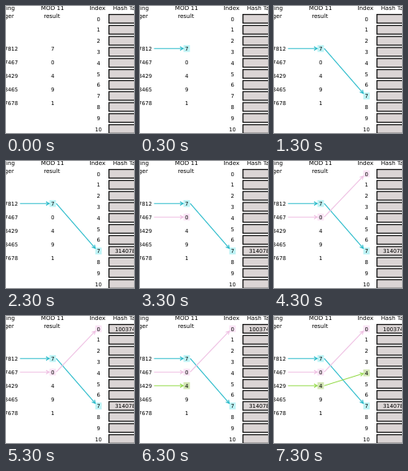
Write an HTML page that moves like this. It is 160x159 px and loops after 8 s.

```html
<!DOCTYPE html>
<html>
<head>
<meta charset="utf-8">
<title>Hash table insertion</title>
<style>
  html, body { margin: 0; width: 100%; height: 100%; overflow: hidden; background: #fff; }
  svg { display: block; width: 100%; height: 100%; }
  text { font: 7.2px "DejaVu Sans", sans-serif; }
  .number { font-size: 6.7px; }
</style>
</head>
<body>
<svg id="stage" viewBox="0 0 160 159"></svg>
<script>
const stage = document.getElementById("stage");
const LOOP = 8000;
const MOD_X = 58.4;
const INDEX_X = 115.6;
const slotY = i => 16 + 13.8 * i;
const rowY = i => 53.2 + 17 * i;

function add(parent, tag, attrs, content = "") {
  const node = document.createElementNS("http://www.w3.org/2000/svg", tag);
  for (const key in attrs) node.setAttribute(key, attrs[key]);
  node.textContent = content;
  parent.append(node);
  return node;
}

function label(parent, x, y, content, anchor = "middle") {
  return add(parent, "text", { x, y, "text-anchor": anchor }, content);
}

function number(parent, x, y, content, anchor) {
  label(parent, x, y + 2.6, content, anchor).setAttribute("class", "number");
}

function arrow(parent, x1, y1, x2, y2, color) {
  const angle = Math.atan2(y2 - y1, x2 - x1) * 180 / Math.PI;
  const length = Math.hypot(x2 - x1, y2 - y1);
  add(parent, "path", {
    d: `M0 0H${length}m-4 -2.3l4 2.3l-4 2.3`,
    transform: `translate(${x1} ${y1}) rotate(${angle})`,
    fill: "none", stroke: color, "stroke-width": 1.1
  });
}

function highlight(parent, x, y, fill) {
  add(parent, "rect", { x: x - 4, y: y - 4.3, width: 8, height: 8.6, fill });
}

// Steps sit between the cells and the labels, so highlights stay behind the digits.
const cells = add(stage, "g", {});
const steps = add(stage, "g", {});
const labels = add(stage, "g", {});
const timeline = [];

function step(start, draw) {
  const group = add(steps, "g", { visibility: "hidden" });
  draw(group);
  timeline.push({ start, group });
}

label(labels, 11, 5.3, "Resulting", "end");
label(labels, 10, 14.8, "integer", "end");
label(labels, 58.2, 5.3, "MOD 11");
label(labels, 57.3, 14.8, "result");
label(labels, 114.3, 5.3, "Index");
label(labels, 133.7, 5.3, "Hash Table", "start");

[["7812", 7], ["7467", 0], ["3429", 4], ["3465", 9], ["7678", 1]].forEach(([digits, mod], i) => {
  number(labels, 15, rowY(i), digits, "end");
  number(labels, MOD_X, rowY(i), mod);
});

for (let i = 0; i <= 10; i++) {
  add(cells, "rect", {
    x: 128.7, y: slotY(i) - 5.4, width: 60, height: 10.8,
    fill: "#dbd5d5", stroke: "#151515", "stroke-width": 1.3
  });
  number(labels, INDEX_X, slotY(i), i);
}

const inserts = [
  { start: 300, slot: 7, value: "31407812", color: "#2cbccb", tint: "#bdf3f5" },
  { start: 3300, slot: 0, value: "10037467", color: "#efc0e3", tint: "#fae4f5" },
  { start: 6300, slot: 4, color: "#98dc50", tint: "#d3e6b4" }
];
inserts.forEach(({ start, slot, value, color, tint }, row) => {
  const y = rowY(row);
  const target = slotY(slot);
  const lean = (target - y) * 0.055;
  step(start, group => {
    highlight(group, MOD_X, y, tint);
    arrow(group, 17.5, y, 54, y, color);
  });
  step(start + 1000, group => {
    highlight(group, INDEX_X, target, tint);
    arrow(group, 62.8, y, 111.6, target - lean, color);
  });
  if (value) step(start + 2000, group => number(group, 136.2, target, value, "start"));
});

function render(now) {
  const time = now % LOOP;
  for (const { start, group } of timeline) {
    group.setAttribute("visibility", time >= start ? "visible" : "hidden");
  }
  requestAnimationFrame(render);
}
render(0);
</script>
</body>
</html>
```
